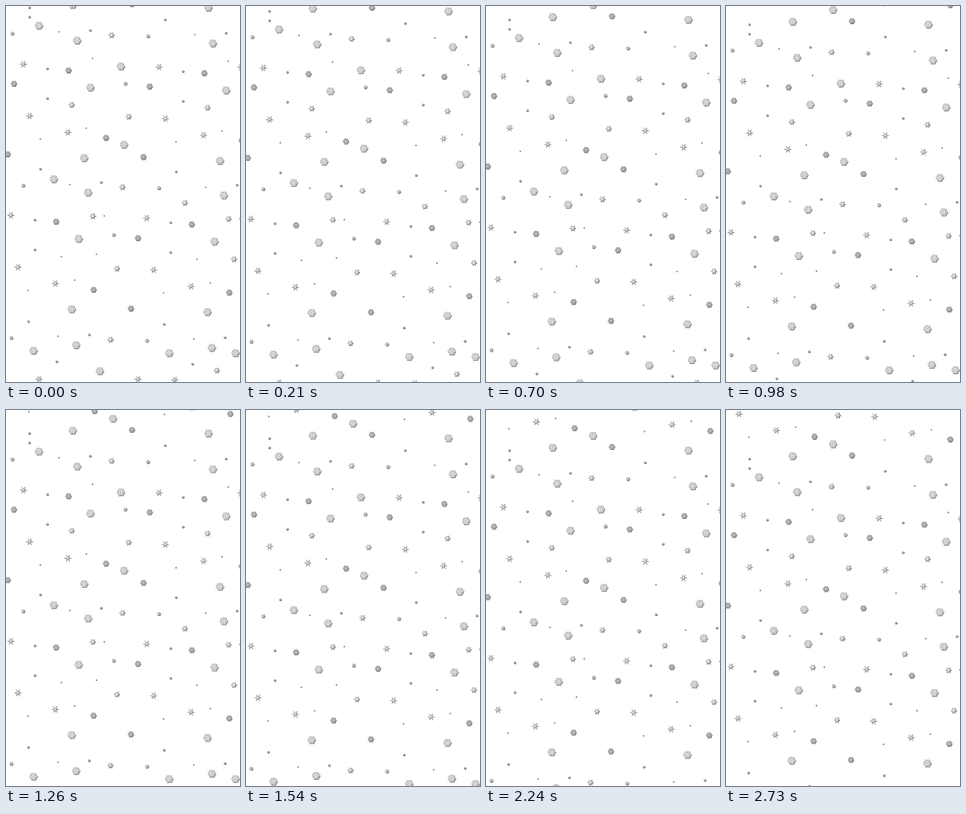
Animation, 300 px wide and 480 px high, one loop 2.8 s. Source, as an HTML page with a canvas:

```html
<!DOCTYPE html>
<html lang="en">
<head>
<meta charset="utf-8">
<title>Snowfall</title>
<style>
html, body { margin: 0; width: 100%; height: 100%; overflow: hidden; background: #fff; }
canvas { display: block; }
</style>
</head>
<body>
<canvas id="stage" width="300" height="480"></canvas>
<script>
const ctx = document.getElementById('stage').getContext('2d');
const WIDTH = 300, HEIGHT = 480;
const STEP_MS = 70, STEPS = 40, FALL = 1.55;

// Centres that repeat over the sky, as x, y pairs
const tiled = {
  ball: [91,44, 147,77, 108,104, 151,177, 100,194, 105,238, 93,297, 84,387],
  pellet: [80,82, 10,99, 128,168, 2,189, 64,275, 169,296, 112,362, 160,386],
  star: [22,74, 30,140, 79,161, 6,267, 15,333, 63,354],
  starlet: [135,37, 84,126, 157,141, 149,231, 111,268, 142,335],
  grain: [8,35, 153,99, 22,229, 138,292],
  speck: [30,14, 108,31, 53,80, 53,118, 44,208, 122,225, 37,273, 37,311],
  dot: [68,33, 111,67, 103,156, 44,170, 82,228, 126,268, 71,320, 88,350, 28,363]
};

// Centres that occur once
const single = {
  ball: [42,25, 61,221, 35,440, 209,443, 120,466, 294,443, 137,-17],
  star: [301,78, 42,476, 216,477, 169,476],
  starlet: [229,251, 292,323, 270,465],
  speck: [30,2, 65,454, 239,457],
  dot: [116,317]
};

const flakes = [];

function eachPoint(groups, visit) {
  for (const [kind, xy] of Object.entries(groups))
    for (let i = 0; i < xy.length; i += 2) visit(kind, xy[i], xy[i + 1]);
}

eachPoint(single, (kind, x, y) => flakes.push({ kind, x, y }));
eachPoint(tiled, (kind, x, y) => {
  for (let col = 0; col < 2; col++)
    for (let row = -1; row < 2; row++) {
      if (row === 1 && y > 60) continue;
      flakes.push({ kind, x: x + 174 * col - 1.3 * row, y: y + 3.5 * col + 388.7 * row });
    }
});

// Closed outline whose radius swings between inner and outer
function lobed(x, y, inner, outer, lobes, color) {
  ctx.fillStyle = color;
  ctx.beginPath();
  for (let i = 0; i < lobes * 2; i++) {
    const a = i * Math.PI / lobes, r = i % 2 ? inner : outer;
    ctx.lineTo(x + r * Math.cos(a), y + r * Math.sin(a));
  }
  ctx.fill();
}

function disc(x, y, r, color) {
  ctx.fillStyle = color;
  ctx.beginPath();
  ctx.arc(x, y, r, 0, Math.PI * 2);
  ctx.fill();
}

function ring(x, y, radius, size, color, turn = 0) {
  for (let i = 0; i < 6; i++) {
    const a = turn + i * Math.PI / 3;
    disc(x + radius * Math.cos(a), y + radius * Math.sin(a), size, color);
  }
}

const draw = {
  ball(x, y) {
    lobed(x + 0.5, y + 0.6, 4.6, 5.5, 6, '#777');
    lobed(x - 0.2, y - 0.2, 4.5, 5.4, 6, '#d0d0d0');
    ring(x, y, 3.1, 0.65, '#999', Math.PI / 6);
    ring(x - 0.3, y - 0.3, 1.8, 0.6, '#f4f4f4');
    disc(x, y, 0.6, '#aaa');
  },
  pellet(x, y) {
    lobed(x + 0.4, y + 0.5, 3.4, 4.2, 6, '#666');
    lobed(x - 0.1, y - 0.1, 3.2, 4, 6, '#b4b4b4');
    ring(x, y, 2.2, 0.6, '#888', Math.PI / 6);
    disc(x, y, 0.6, '#ddd');
  },
  star(x, y) {
    lobed(x + 0.5, y + 0.5, 1.5, 5.3, 6, '#666');
    lobed(x - 0.2, y - 0.2, 1.5, 5, 6, '#c4c4c4');
    disc(x, y, 0.9, '#eee');
  },
  starlet(x, y) {
    lobed(x + 0.5, y + 0.5, 2.4, 4.3, 6, '#666');
    lobed(x - 0.2, y - 0.2, 2.2, 4, 6, '#cacaca');
    disc(x, y, 0.9, '#eee');
  },
  grain(x, y) {
    lobed(x + 0.4, y + 0.4, 2, 2.8, 6, '#666');
    lobed(x - 0.2, y - 0.2, 1.8, 2.5, 6, '#c0c0c0');
  },
  speck(x, y) {
    disc(x + 0.3, y + 0.3, 1.6, '#666');
    disc(x - 0.2, y - 0.2, 1.2, '#b0b0b0');
  },
  dot(x, y) {
    disc(x, y, 1.1, '#8c8c8c');
  }
};

function render(now) {
  const drop = Math.floor(now / STEP_MS) % STEPS * FALL;
  ctx.fillStyle = '#fff';
  ctx.fillRect(0, 0, WIDTH, HEIGHT);
  for (const { kind, x, y } of flakes) draw[kind](x, y + drop);
}

let start;
function tick(now) {
  start ??= now;
  render(now - start);
  requestAnimationFrame(tick);
}

render(0);
requestAnimationFrame(tick);
</script>
</body>
</html>
```
